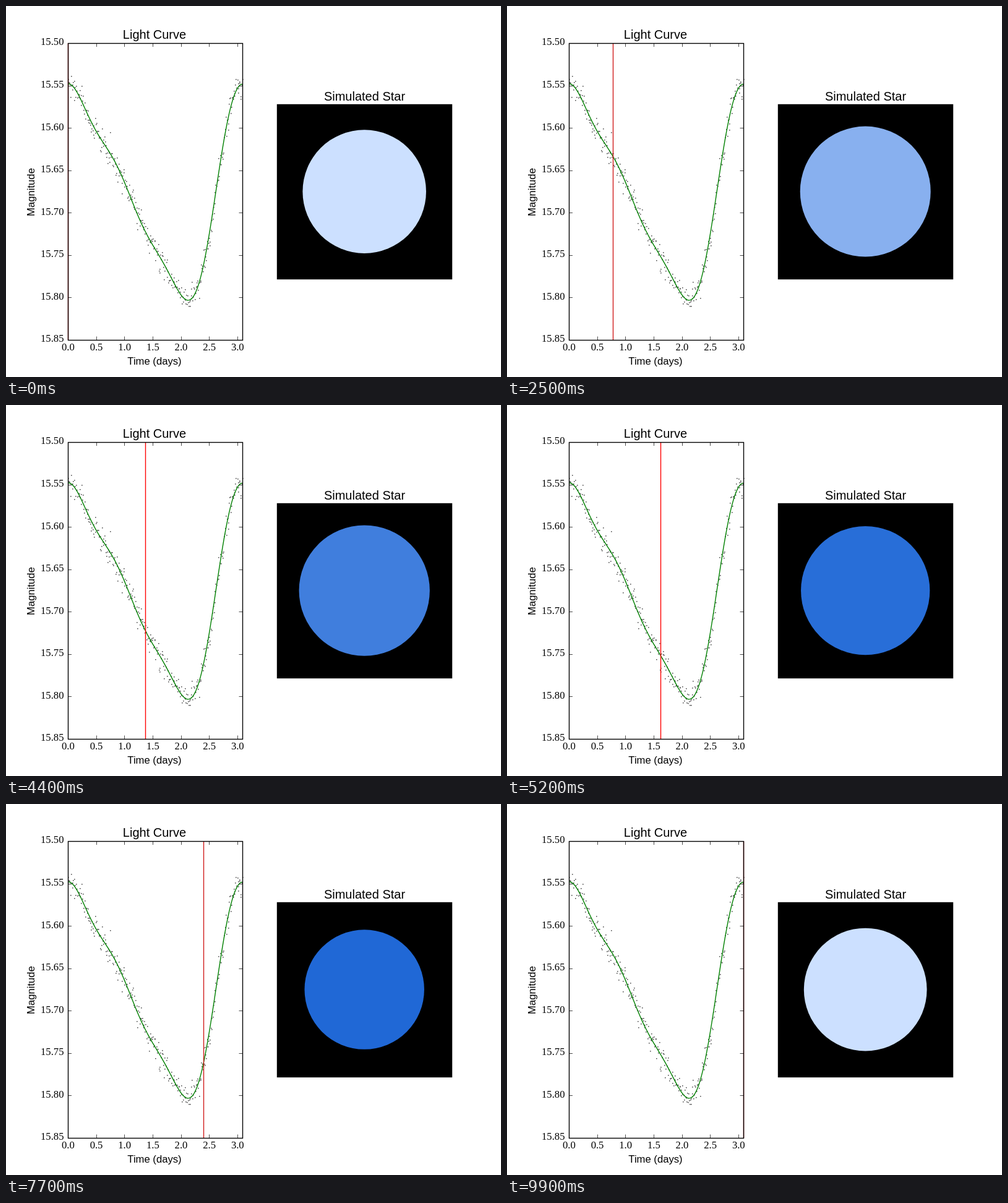
Animation, 800 px wide and 600 px high, one loop 10000 ms. Source, as an HTML page:

```html
<!DOCTYPE html>
<html lang="en">
<head>
<meta charset="utf-8">
<title>Light Curve</title>
<style>
  html, body { margin: 0; width: 100%; height: 100%; overflow: hidden; background: #fff; }
  svg { display: block; width: 800px; height: 600px; }
  .tick { font: 16.67px "Liberation Serif", serif; }
  .label { font: 16.67px "Liberation Sans", sans-serif; text-anchor: middle; }
  .title { font: 20px "Liberation Sans", sans-serif; text-anchor: middle; }
</style>
</head>
<body>
<svg id="stage" viewBox="0 0 800 600"></svg>
<script>
const LEFT = 100, WIDTH = 281.8, TOP = 60, HEIGHT = 480;
const DAY = 91.3, LINE = 1.39;
const STEPS = 100, STEP_MS = 100;
const BRIGHT = [204, 224, 255], DIM = [0, 82, 206];
const stage = document.getElementById('stage');

function add(tag, attrs, text) {
  const node = document.createElementNS('http://www.w3.org/2000/svg', tag);
  for (const key in attrs) node.setAttribute(key, attrs[key]);
  if (text) node.textContent = text;
  return stage.appendChild(node);
}

const snap = v => Math.round(v) + 0.5;
const phaseX = phase => LEFT + phase * WIDTH;

// Fourier series with one [cosine, sine] pair per harmonic; phase runs 0..1.
const fourier = (mean, ...pairs) => phase => pairs.reduce((sum, [c, s], k) => {
  const angle = 2 * Math.PI * (k + 1) * phase;
  return sum + c * Math.cos(angle) + s * Math.sin(angle);
}, mean);

const curveY = fourier(302.7, [-127.4, -88.3], [-43.2, 16.7], [-6, 15.7]);
const starRadius = fourier(101.8, [-2.6, 4.3], [0.4, 0.8], [0.2, 0.2]);

function seeded(seed) {
  return () => (seed = (seed * 16807) % 2147483647) / 2147483647;
}

function drawPoints(count) {
  const rand = seeded(4217);
  let d = '';
  for (let i = 0; i < count; i++) {
    const phase = (i + rand()) / count;
    const spread = rand() < 0.08 ? 34 : 17;
    const noise = (rand() + rand() + rand() + rand() - 2) * spread;
    d += `M${Math.round(phaseX(phase))} ${Math.round(curveY(phase) + noise)}h1.6v1.6h-1.6z`;
  }
  add('path', { d, fill: '#000', 'fill-opacity': 0.7 });
}

function drawCurve(segments) {
  let points = '';
  for (let i = 0; i <= segments; i++) {
    const phase = i / segments;
    points += `${phaseX(phase).toFixed(2)},${curveY(phase).toFixed(2)} `;
  }
  add('polyline', { points, fill: 'none', stroke: '#008000', 'stroke-width': LINE });
}

function drawFrame(x, y, width, height, fill) {
  add('rect', { x, y, width, height, fill, stroke: '#000', 'stroke-width': LINE });
}

function drawAxes() {
  let ticks = '';
  for (let i = 0; i <= 7; i++) {
    const y = TOP + i * HEIGHT / 7;
    ticks += `M100 ${snap(y)}h6M382.5 ${snap(y)}h-6`;
    add('text', { x: 93.5, y: y + 3.4, class: 'tick', 'text-anchor': 'end' },
      (15.5 + i * 0.05).toFixed(2));
  }
  for (let i = 0; i <= 6; i++) {
    const x = LEFT + i * DAY / 2;
    ticks += `M${snap(x)} 60v6M${snap(x)} 540.5v-6`;
    add('text', { x: x + 0.4, y: 556.5, class: 'tick', 'text-anchor': 'middle' }, (i / 2).toFixed(1));
  }
  add('path', { d: ticks, stroke: '#000', 'stroke-width': 0.7 });
  drawFrame(100.5, 60.5, 282, 480, 'none');
  add('text', { x: 240, y: 53, class: 'title' }, 'Light Curve');
  add('text', { x: 240, y: 580, class: 'label' }, 'Time (days)');
  add('text', { transform: 'translate(46 301) rotate(-90)', class: 'label' }, 'Magnitude');
}

drawPoints(310);
drawCurve(200);
const marker = add('path', { 'stroke-width': LINE });
drawAxes();
add('text', { x: 579.5, y: 153, class: 'title' }, 'Simulated Star');
drawFrame(438.5, 159.5, 282, 282, '#000');
const star = add('circle', { cx: 579.2, cy: 300.1 });

function render(time) {
  const step = Math.floor(time / STEP_MS) % STEPS;
  const phase = step / (STEPS - 1);
  marker.setAttribute('d', `M${snap(phaseX(phase))} 60V540`);
  marker.setAttribute('stroke', step % 2 ? '#d01c1c' : '#f00');

  // The star's colour follows the magnitude linearly.
  const dimness = Math.min(1, Math.max(0, (curveY(phase) - 127) / 346));
  const rgb = BRIGHT.map((c, i) => Math.round(c + (DIM[i] - c) * dimness));
  star.setAttribute('fill', `rgb(${rgb})`);
  star.setAttribute('r', starRadius(step / STEPS).toFixed(2));
}

const start = performance.now();
function loop() {
  render(performance.now() - start);
  requestAnimationFrame(loop);
}
loop();
</script>
</body>
</html>
```
